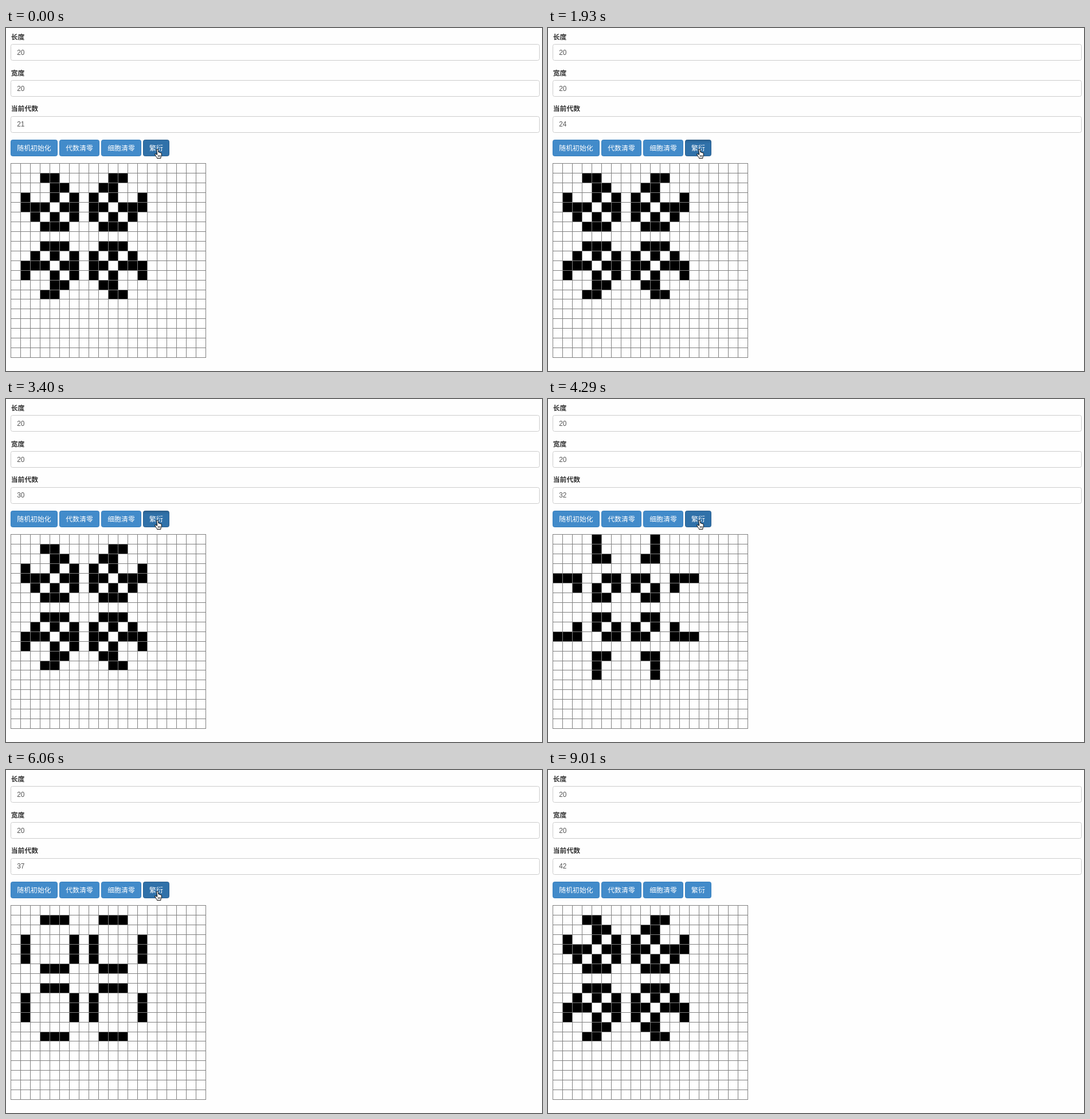
These frames come from a looping animation (935 by 599 pixels, 9240 ms). An HTML page:

```html
<!DOCTYPE html>
<html lang="zh-CN">
<head>
<meta charset="utf-8">
<title>生命游戏</title>
<style>
  html, body { margin: 0; width: 100%; height: 100%; overflow: hidden; background: #fefefe; }
  svg { display: block; }
  text { font: 11.9px "Liberation Sans", "Noto Sans CJK SC", "Noto Sans CJK", sans-serif; }
  .label { font-weight: bold; fill: #333; }
  .value { fill: #555; }
  .caption { fill: #fff; text-anchor: middle; }
  .field { fill: #fff; stroke: #ccc; }
  .button { fill: #428bca; stroke: #357ebd; }
  .hover .button { fill: #3071a9; stroke: #285e8e; }
  .press { visibility: hidden; }
  .active .press { visibility: visible; }
  .cursor { fill: #fff; stroke: #000; stroke-linejoin: round; }
</style>
</head>
<body>
<svg width="935" height="599" viewBox="0 0 935 599">
  <defs>
    <linearGradient id="inset" x2="0" y2="1">
      <stop offset="0" stop-opacity=".14"/>
      <stop offset=".22" stop-opacity="0"/>
    </linearGradient>
  </defs>
  <g id="form"></g>
  <path id="cells"/>
  <path id="lines" fill="none" stroke="#808080"/>
  <g id="hand" class="cursor" transform="translate(264 211.5)">
    <path d="M-1.4 1.2Q-1.2 .2 0 .3Q1 .4 1.2 1.4L2 5.6Q2.8 4.8 3.8 5.6L4 6.2Q5 5.5 5.8 6.6Q7.2 6.3 7.3 8L7.2 11Q7 13.4 6 14.2V16H-.6V14.8Q-2.2 13-3.4 10.8Q-5 9.2-4.2 8.4Q-3.2 7.8-1.8 9.2L-.2 9.6Z"/>
    <path d="M1.4 10.5V13.6M3.2 10.5V13.6M5 10.5V13.6" stroke-width=".8"/>
  </g>
  <path id="arrow" class="cursor" style="fill:#000;stroke:#fff" d="M0 0V14L3.2 11L5.3 16L7.6 15L5.5 10.2H10Z"/>
</svg>
<script>
const LOOP = 9240, SIZE = 20, FIRST = 21;
const births = [290, 740, 1330, 2080, 2220, 2360, 2510, 2960, 3400, 4140, 4290,
  4440, 4580, 4720, 5470, 6060, 6210, 6350, 6500, 6790, 7390];
const presses = [[150, 290], [590, 740], [1180, 1330], [1930, 2080], [2360, 2510],
  [2810, 2960], [3250, 3550], [3990, 4140], [4720, 4870], [5920, 6060],
  [6640, 6790], [7240, 7390]];
// time and share of the way for the pointer leaving the button
const leave = [[8130, .05], [8280, .16], [8430, .36], [8570, .6], [8720, .83], [8870, 1]];
const GONE = 9010;

const $ = id => document.getElementById(id);
const text = (cls, x, y, s) => `<text class="${cls}" x="${x}" y="${y}">${s}</text>`;
const box = (cls, x, y, w, h, extra = '') =>
  `<rect class="${cls}" x="${x}" y="${y}" width="${w}" height="${h}" rx="3" ${extra}/>`;

function buildForm() {
  const fields = [['长度', 20], ['宽度', 20], ['当前代数', FIRST]].map(([name, value], i) => {
    const y = i * 62.8;
    return text('label', 8.7, 19.8 + y, name) +
      box('field', 8.5, Math.round(28 + y) + .5, 922, 28) +
      text('value', 19.2, 46.8 + y, value);
  });
  const buttons = [['随机初始化', 8.5, 81], ['代数清零', 93.5, 69], ['细胞清零', 166.5, 69], ['繁衍', 239.5, 45]]
    .map(([name, x, w]) => `<g class="control">${box('button', x, 195.5, w, 28)}` +
      box('press', x, 195.5, w, 28, 'fill="url(#inset)"') +
      text('caption', x + w / 2, 214, name) + '</g>');
  $('form').innerHTML = fields.join('') + buttons.join('');
}

const edgeX = k => Math.round(8.4 + 16.97 * k);
const edgeY = k => Math.round(235.9 + 16.97 * k);

function buildLines() {
  let d = '';
  for (let k = 0; k <= SIZE; k++)
    d += `M${edgeX(k) + .5} 236V576M8 ${edgeY(k) + .5}H349`;
  $('lines').setAttribute('d', d);
}

// Pulsar oscillator, period 3
function seed() {
  const bar = k => [1, 6, 8, 13].includes(k);
  const run = k => (k > 2 && k < 6) || (k > 8 && k < 12);
  return Array.from({ length: SIZE }, (_, r) =>
    Array.from({ length: SIZE }, (_, c) => (bar(r) && run(c)) || (run(r) && bar(c))));
}

function breed(grid) {
  return grid.map((row, r) => row.map((alive, c) => {
    let n = 0;
    for (let i = -1; i < 2; i++)
      for (let j = -1; j < 2; j++)
        if ((i || j) && grid[r + i]?.[c + j]) n++;
    return n === 3 || (alive && n === 2);
  }));
}

function cellPath(grid) {
  let d = '';
  grid.forEach((row, r) => row.forEach((alive, c) => {
    if (alive) d += `M${edgeX(c)} ${edgeY(r)}H${edgeX(c + 1)}V${edgeY(r + 1)}H${edgeX(c)}Z`;
  }));
  return d;
}

buildForm();
buildLines();
const a = seed(), b = breed(a), c = breed(b);
const phases = [a, b, c].map(cellPath);
const counter = document.querySelectorAll('.value')[2];
const breeder = document.querySelectorAll('.control')[3];
const show = (el, on) => el.setAttribute('visibility', on ? 'visible' : 'hidden');
let last = 0;

function draw(now) {
  const t = now % LOOP;
  const gen = FIRST + births.filter(at => at <= t).length;
  if (gen !== last) {
    counter.textContent = gen;
    $('cells').setAttribute('d', phases[(gen + 2) % 3]);
    last = gen;
  }
  const over = t < leave[0][0];
  breeder.classList.toggle('hover', over);
  breeder.classList.toggle('active', presses.some(([from, to]) => t >= from && t < to));
  show($('hand'), over);
  show($('arrow'), !over && t < GONE);
  if (!over) {
    const p = leave.filter(([at]) => at <= t).pop()[1];
    $('arrow').setAttribute('transform', `translate(${263 + 621 * p} ${212 + 374 * p})`);
  }
}

const start = performance.now();
function tick() {
  draw(performance.now() - start);
  requestAnimationFrame(tick);
}
tick();
</script>
</body>
</html>
```
